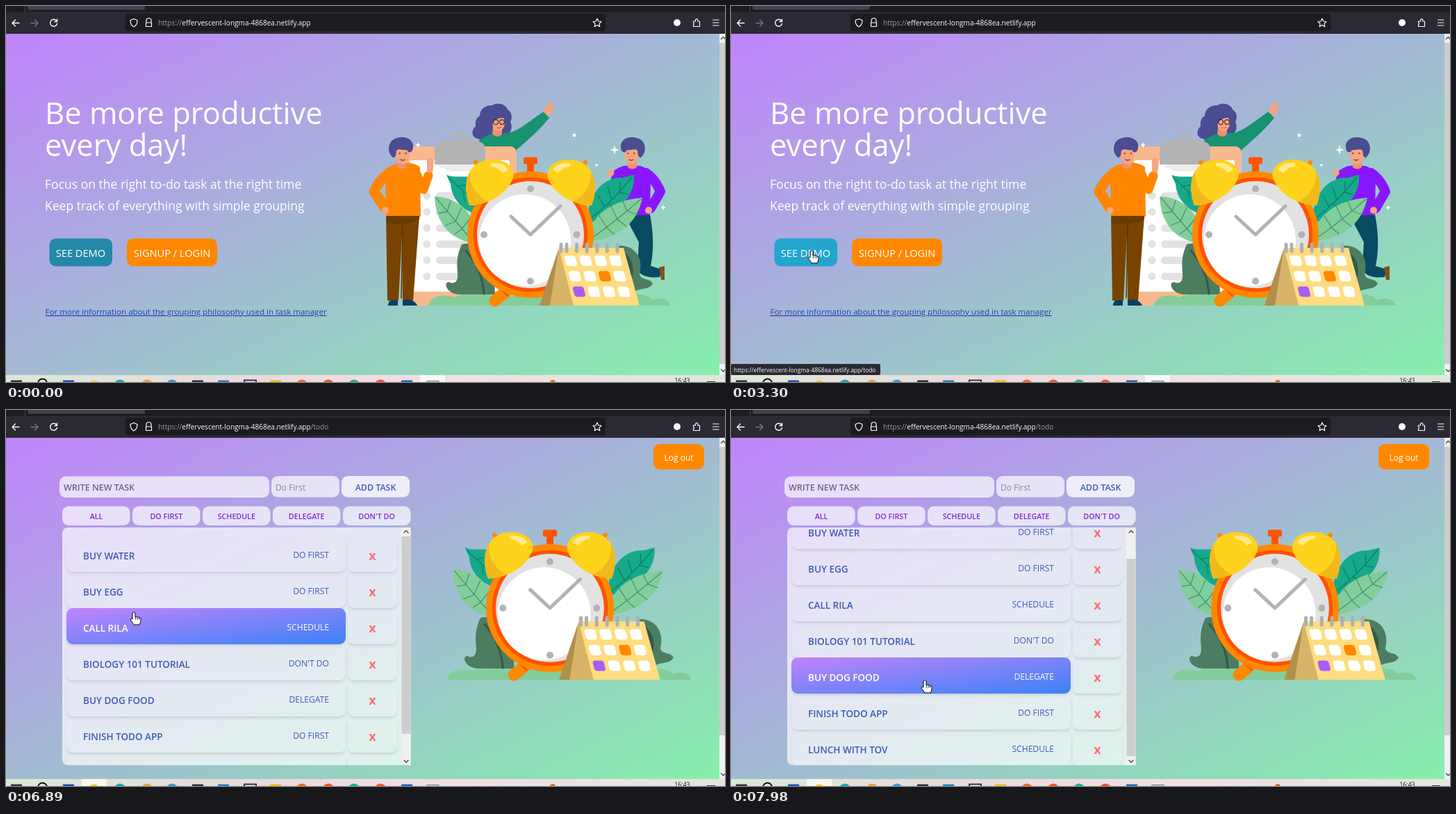
Animation, 1035 px wide and 541 px high, one loop 8 s. Source, as an HTML page:

```html
<!DOCTYPE html>
<html lang="en">
<head>
<meta charset="utf-8">
<title>Task manager demo</title>
<style>
html, body { margin: 0; width: 100%; height: 100%; overflow: hidden; background: #1c1b22; }
#stage { position: absolute; left: 0; top: 0; width: 1035px; height: 541px; overflow: hidden; font-family: "Open Sans", "Noto Sans", sans-serif; }
#stage > svg { position: absolute; left: 0; top: 0; }
#page { position: absolute; left: 0; top: 40px; width: 1027px; height: 491px; background: linear-gradient(to bottom right, #c084fc, #86efac); }
#list { position: absolute; left: 81px; top: 169px; width: 488px; height: 342px; overflow: hidden; border-radius: 9px 0 0 9px; }
#rows { position: absolute; left: 0; top: 0; }
.card { position: absolute; height: 52px; border-radius: 9px; box-shadow: 0 3px 5px -1px rgba(0,0,0,.1), 0 2px 3px -2px rgba(0,0,0,.1); color: #3f5bb8; line-height: 52px; white-space: nowrap; }
.task { left: 6px; width: 402px; }
.task b { position: absolute; left: 24px; top: 3px; font-weight: 600; font-size: 13.5px; }
.task span { position: absolute; right: 24px; top: 2px; font-size: 12.1px; }
.task.hot { background: linear-gradient(to bottom right, #c084fc, #3b82f6); color: #fff; }
.del { left: 411px; width: 71px; text-align: center; color: #f87171; font-weight: 700; font-size: 18px; line-height: 57px; }
</style>
</head>
<body>
<div id="stage">
  <div id="page"></div>
  <svg id="scene" width="1035" height="541"></svg>
  <div id="list"></div>
  <svg id="overlay" width="1035" height="541"></svg>
</div>
<script>
const $ = id => document.getElementById(id);
const ORANGE = '#ff8800', SKIN = '#f7a480', HAIR = '#4b4c92', GREY = '#b3b3b3';

const rect = (x, y, w, h, r, fill, extra = '') =>
  `<rect x="${x}" y="${y}" width="${w}" height="${h}" rx="${r}" fill="${fill}" ${extra}/>`;
const circle = (x, y, r, fill, extra = '') => `<circle cx="${x}" cy="${y}" r="${r}" fill="${fill}" ${extra}/>`;
const shape = (d, fill, extra = '') => `<path d="${d}" fill="${fill}" ${extra}/>`;
const line = (d, color, width) =>
  `<path d="${d}" fill="none" stroke="${color}" stroke-width="${width}" stroke-linecap="round" stroke-linejoin="round"/>`;
const text = (x, y, size, fill, str, extra = '') =>
  `<text x="${x}" y="${y}" font-size="${size}" fill="${fill}" ${extra}>${str}</text>`;
const group = (id, body) => `<g id="${id}">${body}</g>`;
const mirror = (axis, body) => `<g transform="matrix(-1 0 0 1 ${2 * axis} 0)">${body}</g>`;
const middle = 'text-anchor="middle"';

function browser() {
  const ink = '#fbfbfe';
  return rect(0, 0, 1035, 9, 0, '#1c1b22') + rect(31, -6, 169, 11.5, 3, '#42414d') + rect(27, 0, 1, 8, 0, '#4a4953') +
    rect(0, 8.5, 1035, 31.5, 0, '#2b2a33') + rect(172, 11, 691, 25.5, 4, '#1c1b22') +
    line('M19 24.5H9M13.5 20L9 24.5L13.5 29', ink, 1.4) +
    line('M36 24.5H46M41.5 20L46 24.5L41.5 29', '#77767e', 1.4) +
    line('M72.5 21A5 5 0 1 0 73.5 25.5M73.5 19V22.5H70', ink, 1.4) +
    line('M184 18.5L189 20.5C189 26 187 28.5 184 30C181 28.5 179 26 179 20.5Z', ink, 1.2) +
    line('M202 24V21A3.5 3.5 0 0 1 209 21V24M201.5 24H209.5V29.5H201.5Z', ink, 1.2) +
    `<text x="219" y="28" font-size="10.05" fill="#9a99a2">https://<tspan fill="${ink}">effervescent-longma-4868ea.netlify.app</tspan><tspan id="route">/todo</tspan></text>` +
    line('M851 18L852.8 22L857 22.5L854 25.4L854.8 29.6L851 27.5L847.2 29.6L848 25.4L845 22.5L849.2 22Z', ink, 1.2) +
    circle(966, 24, 5, ink) +
    line('M989.5 22H992.5V20A1.7 1.7 0 0 1 995.8 20V22H998.5V29.5H989.5V27A1.6 1.6 0 0 0 989.5 24Z', ink, 1.2) +
    line('M1017.5 20H1026M1017.5 24H1026M1017.5 28H1026', ink, 1.2);
}

function pageScrollbar() {
  return rect(1027, 40, 8, 491, 0, '#f0f0f0') + rect(1027, 53, 8, 462, 0, '#cdcdcd', 'id="thumb"') +
    line('M1029.5 47.5L1032.5 44.5L1035.5 47.5M1029.5 523L1032.5 526L1035.5 523', '#505050', 1.5);
}

function taskbar() {
  const dots = [[164, '#1ba7b5'], [203, '#e8a33a'], [239, '#2f9be0'], [426, '#f26a1b'], [464, '#f2541b'], [501, '#19b87a'], [539, '#f0552a']];
  const boxes = [[15, '#333'], [90, '#1c50b8'], [276, '#2c333b'], [313, '#1c86c8'], [388, '#e6bd1c'], [577, '#1769c0']];
  return rect(0, 531, 1035, 10, 0, 'url(#bar)') +
    rect(596, 531, 36, 10, 0, '#f8f8f8', 'id="recorderTab"') + rect(109, 531, 36, 10, 0, '#f7f8ec', 'id="browserTab"') +
    dots.map(([x, c]) => circle(x, 546.5, 9, c)).join('') +
    boxes.map(([x, c]) => rect(x - 8, 538.5, 16, 10, 0, c)).join('') +
    circle(127, 546.5, 8, '#f2cf1d') + line('M46 543A6.5 6.5 0 0 1 59 543', '#111', 2) +
    rect(343, 538.5, 17, 9, 0, '#e9edf5', 'stroke="#26314f" stroke-width="2"') +
    rect(606, 539.5, 17, 9, 0, '#d8d8d8', 'stroke="#777"') + circle(787, 542, 4, '#c87a24') +
    text(973.5, 542, 8.6, '#111', '16:43', middle) + rect(1009, 540, 12, 4, 0, '#333');
}

function leaves() {
  const leaf = (outline, veins, fill, vein) => shape(outline, fill) + line(veins, vein, 1.3);
  return shape('M608 431C612 416 630 414 645 419C665 411 690 414 710 417H900C908 413 924 415 930 423C942 418 956 422 956 431Z', '#84cd9a') +
    shape('M656 343C682 335 704 370 704 415H652C635 414 629 399 637 397C646 401 651 397 650 384C649 372 648 360 656 343Z', '#4d7d61') +
    line('M662 352C679 372 686 390 688 414', '#315b49', 3) +
    shape('M880 345C907 343 918 365 912 386C914 395 926 391 931 399C926 410 912 404 902 413H880Z', '#4d7d61') +
    shape('M885 350C900 360 910 378 896 404L886 412Z', '#315b49') +
    leaf('M634 243C652 250 672 238 686 258L694 300C664 304 641 280 640 256Z', 'M637 247C653 263 670 277 692 294M650 260L666 256M658 267L660 281M668 275L682 268', '#18a98c', '#0b846d') +
    leaf('M904 243C905 262 899 291 838 313C835 272 860 245 888 247Z', 'M901 246C883 270 862 290 839 308M884 267V253M872 279L866 260M861 289L852 272M882 268L895 271M866 285L882 291', '#16a98a', '#0b806b') +
    leaf('M617 274C654 275 680 302 674 341C637 337 618 309 617 274Z', 'M619 276C638 299 656 320 674 341M635 296L640 280M647 310L656 290M656 321L668 306M635 296L623 298M647 310L632 316M656 321L646 328', '#82ce9b', '#4d916d') +
    leaf('M916 276C871 279 840 302 836 339C878 335 908 316 916 276Z', 'M914 278C886 302 861 322 836 339M894 295L888 281M880 307L871 288M865 319L854 302M894 295L908 300M880 307L893 317M865 319L875 328', '#82ce9b', '#4d916d');
}

function clock() {
  const bell = line('M676 225L682 231', ORANGE, 6) +
    shape('M667 287C654 250 668 221 700 221C720 221 733 232 730 247C724 266 700 286 667 287Z', '#ffd21c') +
    shape('M667 287C661 271 660 251 668 238C667 258 676 272 693 281C684 285 676 287 667 287Z', '#f2b91a') +
    shape('M698 226C711 225 720 229 723 236L715 240C710 234 704 231 698 231Z', '#ffe98c');
  return line('M730 402L704 424', ORANGE, 17) + line('M710 405L722 417', '#ff5500', 3) +
    rect(750, 222, 10, 20, 0, '#ff5500') + rect(745, 217.5, 20, 10, 3, '#ff5500') +
    circle(755, 329, 91, ORANGE) + circle(755, 329, 82.5, '#ff5200') + circle(755, 329, 77, '#e2e2e2') +
    circle(747, 337, 66, '#fff') +
    [[755, 263], [755, 396], [688, 329], [821.5, 329]].map(([x, y]) => circle(x, y, 5, GREY)).join('') +
    line('M727 303L755 329L798 288', GREY, 5) + bell + mirror(755, bell);
}

function calendar() {
  let out = shape('M796 348L768 431H784Z', '#b18f4c') + shape('M796 348L783 431H818Z', '#d7b468') +
    shape('M796 348H889L912 431H817Z', '#ffdc80') + line('M799 343v10', '#b0b0b0', 5);
  for (let i = 0; i < 6; i++) out += line(`M${807 + i * 14.6} 343v10`, '#b0b0b0', 5);
  for (let row = 0; row < 3; row++) for (let col = 0; col < 4; col++) {
    const fill = row === 1 && col === 2 ? ORANGE : row === 2 && col === 0 ? '#aa5cf6' : '#fff';
    out += `<g transform="translate(${813 + col * 21.5 + row * 6} ${366.5 + row * 22.3}) skewX(14)">${rect(-8, -7.5, 16, 15, 4, fill)}</g>`;
  }
  return out;
}

function clipboard() {
  let out = rect(571, 202, 164, 229, 9, '#f9b98f') + rect(581, 222, 144, 189, 2, '#fff') +
    shape('M617 222H690V228L675 238H640L617 228Z', '#ededed') +
    circle(653, 190, 7, 'none', 'stroke="#b3b3b3" stroke-width="4"') +
    shape('M617 228V205C618 195 627 193 653 193C680 193 689 195 690 205V228Z', GREY);
  for (let i = 0; i < 6; i++)
    out += circle(606, 273 + i * 23.2, 5.5, '#e2e2e2') + rect(619, 268 + i * 23.2, 52, 10.5, 5, '#e2e2e2');
  return out;
}

function woman() {
  return shape('M680 191C670 190 669 179 676 173C675 165 678 160 682 158C682 147 692 142 700 143C708 138 719 141 722 149C729 153 729 162 726 167C730 174 727 184 719 185C712 192 700 191 694 193C690 196 684 195 680 191Z', HAIR) +
    shape('M673 210C676 194 690 186 700 184C705 189 712 188 716 183C735 184 752 166 774 152L782 161C766 181 747 196 735 207V214H672Z', '#17936f') +
    shape('M701 174H714V184C711 189 705 189 700 184Z', '#ec916f') + `<ellipse cx="709" cy="168" rx="9" ry="12" fill="${SKIN}"/>` +
    shape('M697 170C696 152 714 148 720 161C712 161 704 160 700 171Z', HAIR) +
    shape('M774 153C776 143 781 138 786 138C789 143 788 150 781 158Z', SKIN) +
    circle(705, 167, 3.6, 'none', 'stroke="#333" stroke-width="1.2"') + circle(714, 167, 3.4, 'none', 'stroke="#333" stroke-width="1.2"') +
    line('M707 175Q711 177 713 174', '#b34f45', 1);
}

// Man's head around x = 570
function head() {
  return shape('M563 219H576V232Q570 237 563 232Z', '#ec916f') + `<ellipse cx="570.5" cy="214" rx="10" ry="14" fill="${SKIN}"/>` +
    shape('M557 218C547 210 550 192 563 190C574 186 588 192 586 204C585 211 580 213 577 207C572 208 565 204 562 208C561 212 562 218 557 218Z', HAIR) +
    line('M566 212h1.5M575 212h1.5M568 221Q571 223 574 221', '#59382f', 1.3);
}

function leftMan() {
  return shape('M547 302H595L586 424H571L570 330L565 424H549Z', '#784300') + line('M571 314L569 420', '#5c3300', 1.5) +
    shape('M550 431C550 423 557 422 564 424V431ZM571 431V424C580 420 590 425 592 431Z', '#063f61') +
    line('M553 240C543 246 535 256 530 267L546 291', '#ff8600', 15) +
    line('M590 240L601 264L608 244', '#ff8600', 13) +
    shape('M546 235C558 225 585 222 596 232L597 303H547Z', '#ff8600') +
    shape('M548 302H595V307Q570 318 548 312Z', '#6a3a00') + head() +
    shape('M606 239L606 222C609 216 615 218 616 224L614 240Z', SKIN) + circle(546, 294, 5, SKIN);
}

function rightMan() {
  return shape('M890 300H927C933 330 932 355 928 374L944 379L941 390C925 392 908 388 909 374L911 340Z', '#074a62') +
    shape('M940 376L948 374V394L943 394Z', '#84501f') +
    line('M921 240C932 247 938 257 942 267L928 291', '#8817ff', 14) +
    shape('M870 252L874 238C882 232 889 229 895 230Q902 234 908 230C919 229 926 237 928 244L927 301H890L893 258Z', '#8817ff') +
    mirror(735.5, head()) + circle(925, 294, 5, SKIN) + circle(871, 240, 4.5, SKIN);
}

function sparkles() {
  const star = (x, y, r) => shape(`M${x} ${y - r}Q${x} ${y} ${x + r} ${y}Q${x} ${y} ${x} ${y + r}Q${x} ${y} ${x - r} ${y}Q${x} ${y} ${x} ${y - r}Z`, '#fff', 'stroke="#fff"');
  return star(876, 207, 5.5) + star(946, 290, 3) + star(593, 200, 3) + circle(818, 186, 2.4, '#fff') + circle(850, 229, 1.8, '#fff');
}

function home() {
  return text(56, 169.5, 43.5, '#fff', 'Be more productive') + text(56, 215.5, 43.5, '#fff', 'every day!') +
    text(56, 263, 17.55, '#fff', 'Focus on the right to-do task at the right time') +
    text(56, 293.5, 17.55, '#fff', 'Keep track of everything with simple grouping') +
    rect(62.5, 334.5, 90.5, 40, 9, '#2389a8', 'id="demo"') + text(107.5, 361, 14.6, '#fff', 'SEE DEMO', middle) +
    rect(174, 334.5, 130, 40, 9, ORANGE) + text(239, 361, 14.6, '#fff', 'SIGNUP / LOGIN', middle) +
    text(56.5, 444, 11.6, '#1e40af', 'For more information about the grouping philosophy used in task manager', 'text-decoration="underline"') +
    woman() + clipboard() + sparkles() + rightMan() + '<use href="#still"/>' + leftMan();
}

function app() {
  const glass = 'fill-opacity=".7"', semi = 'font-weight="600"';
  const filters = ['ALL', 'DO FIRST', 'SCHEDULE', 'DELEGATE', "DON'T DO"];
  return rect(932, 49, 73, 36.5, 9, ORANGE) + text(968.5, 73, 12, '#fff', 'Log out', middle) +
    rect(77, 95.5, 302, 30.5, 9, '#fff', glass) + text(83, 116, 12.5, '#66668a', 'WRITE NEW TASK', semi) +
    rect(382, 95, 98, 30.5, 9, '#fff', glass) + text(388, 115.5, 12, '#8c86a0', 'Do First') +
    rect(483, 95, 98, 30.5, 9, '#fff', 'fill-opacity=".8"') + text(532, 115.5, 12.4, '#3f5bb8', 'ADD TASK', `${semi} ${middle}`) +
    filters.map((label, i) => rect(81 + i * 101, 138.5, 97.5, 27.5, 9, '#fff', glass) +
      text(130 + i * 100.9, 156.5, 10.7, '#8127d6', label, `${semi} ${middle}`)).join('') +
    shape('M90 169H582.5V511H90Q81 511 81 502V178Q81 169 90 169Z', '#fff', glass) +
    rect(569.5, 169, 13, 342, 0, '#f0f0f0') + rect(569.5, 182, 13, 284, 0, '#cdcdcd', 'id="listThumb"') +
    line('M573 176.5L576 173.5L579 176.5M573 504L576 507L579 504', '#505050', 1.6) +
    '<use id="appArt" href="#still" transform="translate(19.3 -47.8) scale(1.0115)"/>';
}

$('scene').innerHTML = `<defs>
  <linearGradient id="bar"><stop stop-color="#dce8d8"/><stop offset=".35" stop-color="#ead9dc"/><stop offset=".6" stop-color="#f2dfe4"/><stop offset="1" stop-color="#e2e6dc"/></linearGradient>
  ${group('still', leaves() + clock() + calendar())}</defs>` +
  browser() + pageScrollbar() + group('home', home()) + group('app', app()) + taskbar();

$('overlay').innerHTML =
  group('status', rect(0, 515, 215, 16, 2, '#2b2a33') + text(4, 526.5, 8.4, '#fbfbfe', 'https://effervescent-longma-4868ea.netlify.app/todo')) +
  group('cursor',
    group('arrow', shape('M0 0V15L3.6 11.8L6.2 17.5L8.6 16.4L6 11H11Z', '#fff', 'stroke="#000"')) +
    group('hand', shape('M-2 1Q0 -2 2 1V7Q4 5.3 5 7.3Q7 5.8 7.7 8Q10 7 10 9.5V13Q9.5 15 8 18H0Q-2 14.5 -5 11Q-4.6 8.4 -2 10Z', '#fff', 'stroke="#000"') +
      line('M2.3 7V10.5M5 7.6V10.5M7.6 8.2V10.5', '#000', .8)));

const tasks = [['BUY WATER', 'DO FIRST'], ['BUY EGG', 'DO FIRST'], ['CALL RILA', 'SCHEDULE'], ['BIOLOGY 101 TUTORIAL', "DON'T DO"],
  ['BUY DOG FOOD', 'DELEGATE'], ['FINISH TODO APP', 'DO FIRST'], ['LUNCH WITH TOV', 'SCHEDULE']];
$('list').innerHTML = group('rows', '').replace(/g(?= id|>$)/g, 'div');
$('rows').innerHTML = tasks.map(([name, kind], i) => {
  const top = `style="top:${12 + i * 52}px"`;
  return `<div class="card task" ${top}><b>${name}</b><span>${kind}</span></div><div class="card del" ${top}>x</div>`;
}).join('');
const cards = [...document.querySelectorAll('.task')];

// Pointer tip: time, x, y
const path = [[450, 954, 511], [640, 880, 400], [900, 740, 260], [1100, 620, 177], [1210, 572, 183], [1280, 566, 190],
  [1600, 430, 280], [1910, 351, 327], [2190, 348, 318], [2400, 285, 283], [2600, 180, 318], [2740, 128, 345], [2950, 118, 351], [3010, 116, 352],
  [6560, 116, 352], [6890, 184, 291], [7180, 261, 271], [7610, 261, 271], [7800, 272, 325], [7980, 279, 389]];

const clamp = v => Math.max(0, Math.min(1, v));
const progress = (t, from, to) => clamp((t - from) / (to - from));
const mix = (a, b, p) => a + (b - a) * p;
const show = (id, on) => { $(id).style.display = on ? '' : 'none'; };

function pointerAt(t) {
  const next = path.findIndex(p => p[0] > t);
  if (next < 0) return path[path.length - 1].slice(1);
  if (next === 0) return path[0].slice(1);
  const a = path[next - 1], b = path[next], p = progress(t, a[0], b[0]);
  return [mix(a[1], b[1], p), mix(a[2], b[2], p)];
}

function render(t) {
  const onApp = t >= 6170, [x, y] = pointerAt(t);
  show('home', !onApp);
  show('app', onApp);
  show('list', onApp);
  show('appArt', t >= 6590);
  show('route', t >= 3840);
  show('recorderTab', t < 3500);
  show('browserTab', t >= 3500);
  $('thumb').setAttribute('height', onApp ? 415 : 462);

  const hover = progress(t, 2710, 2930);
  $('demo').setAttribute('fill', `rgb(35 ${mix(137, 166, hover)} ${mix(167, 205, hover)})`);
  $('status').style.opacity = t < 3770 ? progress(t, 3110, 3300) : 0;

  const scrolled = 1 - (1 - progress(t, 7350, 7510)) ** 2;
  $('rows').style.top = `${-33.5 * scrolled}px`;
  $('listThumb').setAttribute('y', 182 + 32 * scrolled);
  // Hover is only re-evaluated once the pointer moves again after scrolling.
  const hot = Math.floor((y + (t < 7620 ? 0 : 33.5) - 181) / 52);
  cards.forEach((card, i) => card.classList.toggle('hot', i === hot));

  const overButton = onApp || (x > 63 && x < 153 && y > 335);
  show('cursor', t >= 450);
  show('hand', overButton);
  show('arrow', !overButton);
  $('cursor').setAttribute('transform', `translate(${Math.round(x)} ${Math.round(y)})`);
}

const start = performance.now();
function tick() {
  render((performance.now() - start) % 8000);
  requestAnimationFrame(tick);
}
tick();
</script>
</body>
</html>
```
